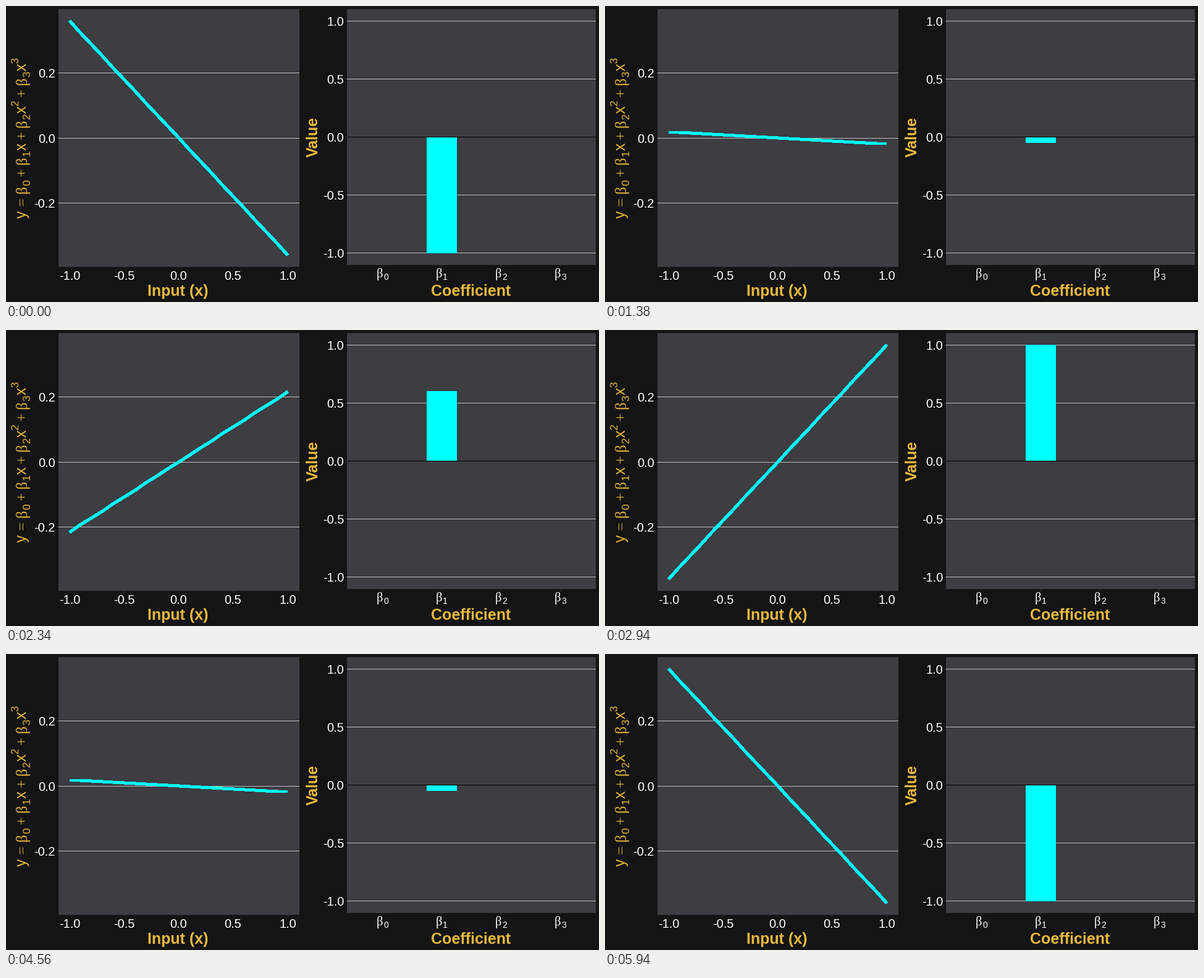
Recreate the animation shown at these times as a matplotlib script. Size 960 by 480 pixels, loop 6 s.

```python
import numpy as np
import matplotlib.pyplot as plt
from matplotlib.animation import FuncAnimation
from matplotlib.patches import Rectangle

W, H, DPI = 960, 480, 80
FRAMES, INTERVAL = 100, 60
BACK, PANEL, GRID, TICK = "#141414", "#3d3d42", "#bebebe", "#333333"
GOLD, CYAN = "#e8b93c", "#00ffff"
SANS, SERIF = "Liberation Sans", "Liberation Serif"
PT = 72 / DPI  # points per pixel

fig = plt.figure(figsize=(W / DPI, H / DPI), dpi=DPI, facecolor=BACK)
ax = fig.add_axes([0, 0, 1, 1])
ax.set_xlim(0, W)
ax.set_ylim(H, 0)
ax.axis("off")


def box(x0, y0, x1, y1, color, z=1):
    return ax.add_patch(Rectangle((x0, y0), x1 - x0, y1 - y0,
                                  facecolor=color, linewidth=0, zorder=z))


def text(x, y, s, size, color, family=SANS, ha="center", weight="normal", angle=0):
    ax.text(x, y, s, fontsize=size * PT, color=color, family=family, ha=ha,
            va="baseline", weight=weight, rotation=angle,
            rotation_mode="anchor", zorder=5)


def panel(x0, y0, x1, y1, y_ticks, x_ticks):
    """Panel background with horizontal grid lines and axis ticks."""
    box(x0, y0, x1, y1, PANEL)
    for row, label in y_ticks:
        box(x0, row, x1, row + 1, GRID, 2)
        box(x0 - 3, row, x0, row + 1, TICK)
        text(x0 - 5, row + 8, label, 20, "white", ha="right")
    for x in x_ticks:
        box(x, y1, x + 1, y1 + 3, TICK)


# Left panel: the curve
LEFT_X = [103, 191, 279, 367, 456]
panel(85, 5, 475, 423, [(108, "0.2"), (214, "0.0"), (319, "-0.2")], LEFT_X)
for x, v in zip(LEFT_X, np.linspace(-1, 1, 5)):
    text(x, 444, f"{v:.1f}", 20, "white")
text(278.5, 470, "Input (x)", 25, GOLD, weight="bold")

# Right panel: the coefficients
RIGHT_X = [609, 705, 801, 897]
panel(552, 5, 955, 420,
      [(212 - round(188 * v), f"{v:.1f}") for v in (1, 0.5, 0, -0.5, -1)], RIGHT_X)
box(552, 212, 955, 213, "black", 4)
for i, x in enumerate(RIGHT_X):
    text(x - 9, 440, "β", 20.5, "white", SERIF, "left")
    text(x + 2.3, 444, str(i), 14, "white", ha="left")
text(753, 470, "Coefficient", 25, GOLD, weight="bold")
text(505, 212.5, "Value", 25, GOLD, weight="bold", angle=90)


def formula(x, y, size):
    """Vertical polynomial label, each glyph placed by its advance width."""
    small = 0.7 * size

    def put(s, width, em=size, shift=0, family=SANS, pad=0):
        nonlocal y
        y -= pad * size
        text(x + shift, y, s, em, GOLD, family, "left", angle=90)
        y -= width * em + pad * size

    put("y", 0.5)
    put("=", 0.549, family=SERIF, pad=5 / 18)
    for k in range(4):
        if k:
            put("+", 0.549, family=SERIF, pad=4 / 18)
        put("β", 0.549, family=SERIF)
        put(str(k), 0.556, small, 6)
        if k:
            put("x", 0.5)
        if k > 1:
            put(str(k), 0.556, small, -13)


formula(33, 343.5, 24.5)

xs = np.linspace(-1, 1, 21)
curve, = ax.plot(np.round(279.5 + 176.7 * xs), 0 * xs, color=CYAN,
                 linewidth=4 * PT, solid_capstyle="butt",
                 antialiased=False, zorder=3)
bar = box(681, 212, 730, 213, CYAN, 3)

# 41 coefficient values spread over 50 frames, snapped to whole frames
KEYS = np.round(49 * np.arange(41) / 40)
VALUES = np.linspace(-1, 1, 41)


def update(n):
    beta = np.interp(min(n, FRAMES - 1 - n), KEYS, VALUES)
    curve.set_ydata(np.round(214 - 189.7 * beta * xs))
    end = int(np.floor(212.5 - 188 * beta + 1e-6))
    top, bottom = min(end, 212), max(end, 212) + 1
    bar.set_y(top)
    bar.set_height(bottom - top)
    return curve, bar


anim = FuncAnimation(fig, update, frames=FRAMES, interval=INTERVAL,
                     repeat=True, repeat_delay=0)
plt.show()
```
